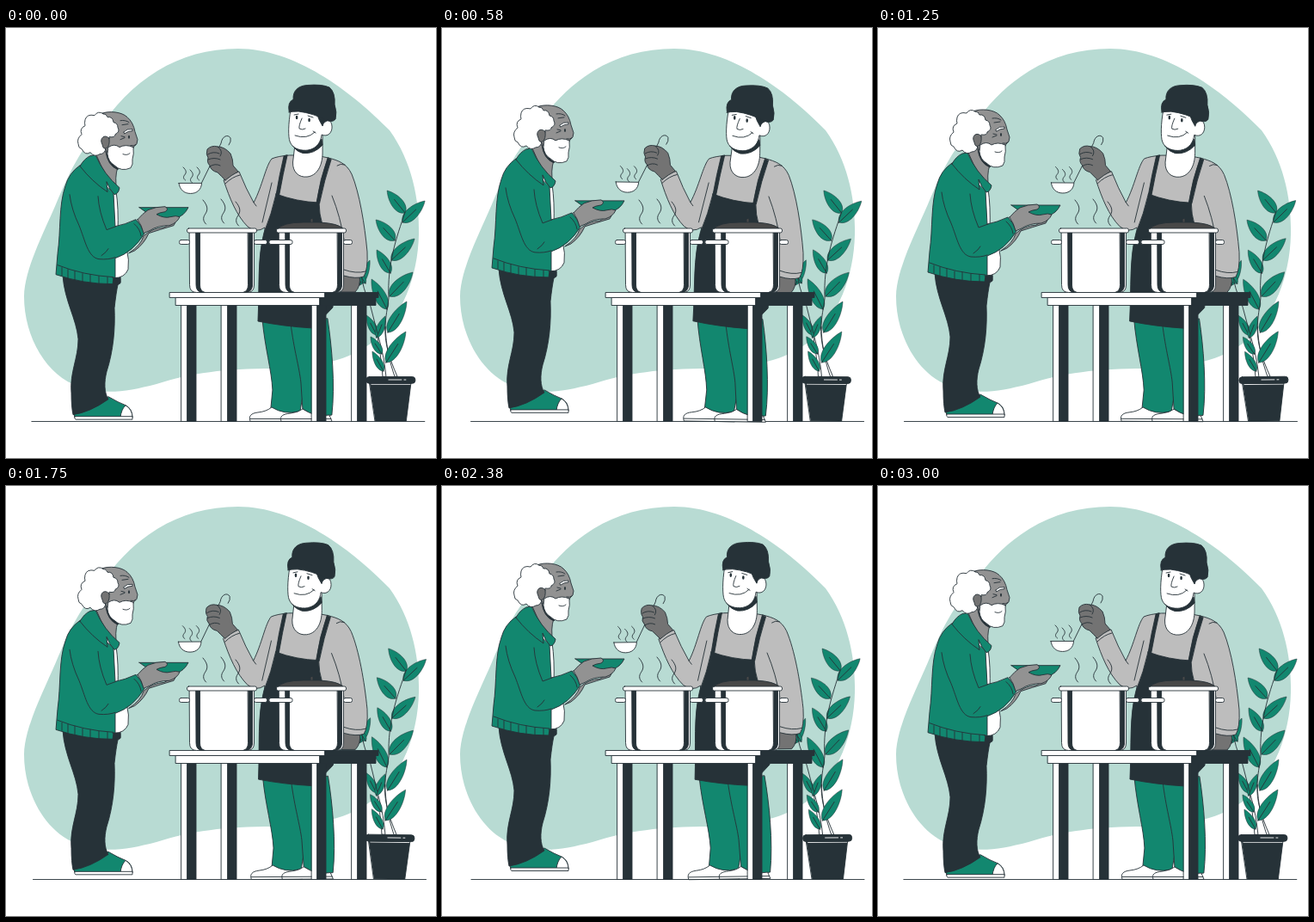
These frames come from a looping animation (500x500 px, 3040 ms). An HTML page:

```html
<!DOCTYPE html>
<html lang="en">
<head>
<meta charset="utf-8">
<title>Soup kitchen</title>
<style>
html, body { margin: 0; width: 100%; height: 100%; overflow: hidden; background: #fff; }
svg { display: block; width: 100vw; height: 100vh; }
path, rect, ellipse { stroke: #263238; stroke-width: .9; stroke-linecap: round; stroke-linejoin: round; }
.w { fill: #fff; }
.d { fill: #263238; }
.g { fill: #12876f; }
.l { fill: none; }
.skin { fill: #929292; }
.glove { fill: #737373; }
.wool { fill: #bdbdbd; }
.lid { fill: #484848; }
.x { stroke: none; }
.leaf { fill: #12876f; stroke-width: .5; }
.shine { fill: none; stroke: #fff; }
</style>
</head>
<body>
<svg viewBox="0 0 500 500">
  <path class="x" fill="#b8dbd3" d="M270 24C335 24 400 72 446 119C472 155 481 200 480 240C479 290 460 335 430 362C400 388 360 394 310 396C255 396 215 401 175 414C140 423 115 427 85 417C48 405 21 360 21 312C22 280 42 242 58 205C75 165 85 145 105 122C145 60 200 24 270 24Z"/>
  <path id="floor" class="l" d="M30 457.5H487"/>

  <g id="plant">
    <g id="leaves"></g>
    <path class="d" d="M423 413H471L465.500 457H429.500Z"/>
    <path class="shine" d="M425 414.300H470"/>
    <rect class="d" x="419" y="405.500" width="57" height="7.800" rx="3.500"/>
    <path class="shine" d="M445 409H460M463 409H465"/>
  </g>

  <g id="chef">
    <!-- legs and shoes -->
    <path class="g" d="M298 338C301 372 309 398 310 421L308 442Q325 452 342 446L350 400L344 343Z"/>
    <path class="g" d="M331 343C335 375 341 394 343 412L345 443Q360 454 379 450C383 415 379 370 374 338Z"/>
    <path class="w" d="M284 457C282 451 285 448 293 447Q303 446 309 441Q324 450 340 446L343 457Z"/>
    <path class="w" d="M320 457C318 451 322 449 331 448Q340 447 345 443Q360 453 376 450L379 457Z"/>
    <path class="l" d="M284 454.500H320M320 454.500H378"/>
    <!-- right hand and sweater -->
    <path class="glove" d="M393 283L411 288Q413 300 406 307H390Z"/>
    <path class="wool" d="M329 148Q316 149 309 152C302 160 298 184 288 203Q279 187 271 167Q260 170 253 177C260 198 268 218 281 231Q291 239 301 232L298 300H380L393 288Q407 292 416 289Q421 281 420 260C417 228 411 192 402 170C396 157 386 154 375 151L360 148Z"/>
    <path class="l" d="M393 281Q407 286 418 283M288 203L291 207M309 180Q303 205 298 226M385 160Q389 157 394 159M379 195Q389 220 393 246M255 181Q263 173 272 171"/>
    <!-- apron -->
    <path class="d" d="M314 193Q338 202 364 203Q364 216 368 229L386 250L380 325L357 349Q323 347 293 341C295 300 292 268 300 238Q309 216 314 193Z"/>
    <path class="d" d="M323 149Q318 170 314 194L317.500 195Q322 170 327 148ZM374 151Q365 176 361 203L364.500 204Q370 177 378 153Z"/>
    <!-- head -->
    <path class="w" d="M336 135L333.500 156C333 168 341 174 350 173C361 172 368 161 368 145V122Z"/>
    <path class="d" d="M333 137Q349 146 367 129L368 136Q358 147 345 145.500Q338 144 333 137Z"/>
    <path class="w" d="M331 95C328 111 328 127 330 132C333 141 344 143 351 142C362 140 366 132 367 124C374 127 379 122 379 115Q379 108 373 106L362 98Z"/>
    <path class="d" d="M361 99L377 107Q369 108 368 114Q364 108 361 99Z"/>
    <path class="d" d="M329 97Q327 86 334 83C333 73 340 67 350 66.500Q367 65 376 69Q383 75 382 89Q385 98 383 106Q380 110 373 107.500Q357 99 340 97Q332 97 329 98Z"/>
    <path class="l" d="M344 105Q340 114 341 117Q344 119 348 117M336 125Q350 130 359 121M357 120L360 122M335 101L340 100M351 102L357 104"/>
    <ellipse class="d x" cx="338" cy="104" rx="1.300" ry="2.300"/>
    <ellipse class="d x" cx="352.500" cy="107" rx="1.300" ry="2.300"/>
    <!-- ladle -->
    <path class="l" d="M227 181L250 134C251 126 258 123 261 128Q262 132 259 136"/>
    <path class="w" d="M201 180.500H227.500C227 188 222 192.500 214.500 192.500C207 192.500 202 188 201 180.500Z"/>
    <path class="glove" d="M255 177Q250 172 246 168Q238 166 237 160Q233 156 235 151Q232 147 234 141Q239 136 246 138Q254 138 261 146Q264 153 264 160L270 167Q262 171 255 177Z"/>
    <path class="l" d="M234.500 147Q241 143 248 146M235 153Q242 150 249 153M237 161Q243 157 249 160M246 138Q253 143 249 149"/>
    <g id="wisps"></g>
  </g>

  <g id="table"></g>
  <g id="pots"></g>

  <g id="man">
    <!-- trousers and shoes -->
    <path class="g" d="M80 453L78 446L119 429Q131 436 139 439Q147 443 147 453Z"/>
    <path class="w" d="M133 453Q134 444 139 439Q147 444 147 453Z"/>
    <path class="w" d="M80 452H147V455.500H81Q79 455 80 452Z"/>
    <path class="d" d="M66 288C68 318 82 338 84 362C84 385 74 400 76 425Q76 441 78 450Q98 447 119 432C114 424 114 412 117 400C125 375 127 350 126 326Q128 308 130 299L133 297V286Z"/>
    <!-- shirt, neck and far arm -->
    <path class="w" d="M116 180L128 190Q131 210 130 237Q145 258 142 281Q138 291 126 291Z"/>
    <path class="skin" d="M143 262Q157 253 160 242Q170 233 184 232Q197 225 201 219L195 230Q178 235 166 239Q161 251 150 259Z"/>
    <path class="skin" d="M105 148L119 139L130 162Q126 174 129 190Q118 179 105 148Z"/>
    <!-- jacket -->
    <path class="g" d="M86 160Q73 169 69 184C61 207 64 235 60 263Q59 275 58 287Q90 298 124 298L125 291H127L127 268Q148 261 161 239Q157 229 151 223Q138 229 127 231L125 192Z"/>
    <path class="g" d="M86 161Q91 152 98 149L104 148Q114 171 132 186Q131 193 126 194Q120 188 117 179L118 191Q100 179 86 161Z"/>
    <path class="l" d="M74 194Q76 211 85 230C92 247 95 267 108 269Q119 270 127 267M107 196Q108 214 117 235L128 231M60 276Q90 288 125 290M65 279V288M72 281V291M80 283V293M89 286V295M98 287V296M108 289V297M118 290V298M124 291H133V296M149 228Q156 234 157 242M111 265Q117 261 119 257"/>
    <!-- bowl and near hand -->
    <path class="g" d="M155 209H212Q207 219 198 221H174Q164 216 155 209Z"/>
    <path class="skin" d="M153 223Q159 216 165 212Q174 208 185 208Q190 211 185 214Q178 215 175 217Q184 222 191 220Q198 218 202 220Q199 227 190 230Q176 230 167 236L160 239Q158 230 153 223Z"/>
    <!-- head -->
    <path class="skin" d="M110 100C120 96 135 98 141 104Q148 110 150 121L153 130Q153 136 149 138L145 146L118 145L106 123Z"/>
    <path class="d" d="M116 144Q120 159 132 162L130 165Q118 160 116 144Z"/>
    <path class="w" d="M119 139Q126 134 132 139Q139 135 148 139Q149 147 147 153Q148 159 145 163Q134 168 126 160Q119 156 118 147Z"/>
    <path class="w" d="M113 100Q107 96 103 102Q94 100 92 107Q91 111 92 114Q85 117 88 124Q82 129 84 135Q84 140 88 141Q92 149 98 145Q103 151 109 147Q115 147 116 140L120 127Q127 128 127 124Q133 121 130 116Q130 111 125 110Q124 103 118 104Q117 100 113 100Z"/>
    <path class="glove" d="M120 129Q117 125 113 127Q109 130 112 136Q113 142 117 140Q121 137 120 129Z"/>
    <path class="l" d="M133 108Q139 107 143 110M135 113L142 112M134 126L138 127M133 130L138 128M145 137Q149 138 151 136M136 147Q141 149 144 146"/>
    <path class="w" d="M137 121Q141 117 147 118L147 120Q142 120 138 123Z"/>
    <ellipse class="d x" cx="143" cy="127" rx="1" ry="2"/>
  </g>
</svg>
<script>
const $ = id => document.getElementById(id);
const path = (cls, d) => `<path class="${cls}" d="${d}"/>`;
const box = (cls, x1, y1, x2, y2, r = 0) =>
  `<rect class="${cls}" x="${x1}" y="${y1}" width="${x2 - x1}" height="${y2 - y1}" rx="${r}"/>`;

// A leaf from base (x, y) to tip (u, v), w wide on each side
function leaf([x, y, u, v, w]) {
  const dx = u - x, dy = v - y, len = Math.hypot(dx, dy);
  const at = (k, side) => `${x + dx * k - dy / len * side} ${y + dy * k + dx / len * side}`;
  return path('leaf', `M${x} ${y}C${at(.15, w * 1.2)} ${at(.7, w * .8)} ${u} ${v}C${at(.7, -w * .8)} ${at(.15, -w * 1.2)} ${x} ${y}Z`) +
    path('l', `M${x} ${y}L${at(.6, 0)}`);
}

const leaves = [
  [464, 215, 443, 189, 9], [461, 226, 487, 201, 9],
  [452, 247, 430, 223, 9], [448, 270, 475, 245, 9],
  [447, 285, 431, 258, 8], [446, 312, 473, 284, 10],
  [443, 327, 425, 292, 9], [444, 354, 466, 318, 9],
  [442, 389, 465, 353, 9], [411, 299, 423, 270, 6],
  [418, 297, 407, 281, 5], [431, 357, 419, 334, 6],
  [431, 360, 441, 335, 6], [437, 379, 424, 359, 6],
  [439, 399, 426, 376, 6]
];
$('leaves').innerHTML =
  path('w', 'M455 405C445 382 440 365 441 347C442 370 446 388 452 405Z') +
  path('w', 'M442 405C440 385 436 368 431 352C434 372 437 388 438 405Z') +
  leaves.map(leaf).join('') +
  path('l', 'M441 350C441 335 444 325 445 314C443 275 454 243 464 214') +
  path('l', 'M432 355L424 324Q414 300 413 286');

// Wavy line of steam, h tall
const steam = (x, y, h, w) =>
  path('l', `M${x} ${y}c${w} ${h * .25} ${w} ${h * .42} ${w * .4} ${h * .6}c${-w * .5} ${h * .16} ${-w * .3} ${h * .3} ${w * .2} ${h * .4}`);
$('wisps').innerHTML = [[206, 162], [214, 165], [222, 162]].map(([x, y]) => steam(x, y, 15, 4)).join('');

const leg = (x, mid, end) => box('w', x, 322, mid, 457.500) + box('d', mid, 322, end, 457.500);
$('table').innerHTML =
  leg(204, 211, 221) + leg(250.500, 258, 268) + leg(402, 409, 419) + leg(355.500, 362, 372) +
  box('w', 197.500, 313.500, 365, 322.500) + box('d', 365, 313.500, 430, 322.500) +
  box('w', 190.500, 307.500, 371, 313.500) + box('d', 371, 307.500, 433, 313.500);

function pot(x, handle) {
  const r = x + 75;
  return path('w', `M${x} 237H${r}V299Q${r} 307.500 ${r - 8} 307.500H${x + 8}Q${x} 307.500 ${x} 299Z`) +
    path('d', `M${x + 7.5} 238h4.500V299q0 7 6 8.500h-4q-6.500 -1 -6.500 -8.500Z`) +
    path('d', `M${r - 7} 238h5V300q-1 7 -7 7.500h-4q6 -1.500 6 -8.500Z`) +
    box('w', x - 3, 233, r + 3, 238, 2) +
    box('w', x - 12, 246.500, x, 251.500, 2) + box('w', r, 246.500, r + handle, 251.500, 2);
}
$('pots').innerHTML =
  [[229, 200], [250, 199], [267, 202]].map(([x, y]) => steam(x, y, 28, 6)).join('') +
  pot(213.500, 15) +
  box('lid', 354, 221.500, 357, 228, 1) +
  path('lid', 'M316 234Q321 226 346 226H364Q387 227 393 234Z') +
  pot(317.500, 10) +
  box('w', 306, 246.500, 333, 251.500, 2);

// Value at phase p of a linear track of [phase, value] steps
function track(steps, p) {
  const i = steps.findIndex(s => s[0] >= p) || 1;
  const [a, u] = steps[i - 1], [b, v] = steps[i];
  return u + (v - u) * (p - a) / (b - a);
}
const sway = [[0, 0], [.25, 1], [.75, -1], [1, 0]];
const float = [[0, 0], [.5, -10], [1, 0]];
const shake = [0, -1, 2, -4, 4, -4, 4, -4, 2, -1, 0].map((v, i) => [i / 10, v]);

const LOOP = 3040, STEP = 1000 / 24, LEAD = 25;
function draw(now) {
  const k = Math.min(72, Math.floor((now % LOOP + 9) / STEP));
  const t = k * STEP + LEAD;
  const slow = t % 3000 / 3000, fast = t % 1500 / 1500;
  const set = (id, v) => $(id).setAttribute('transform', v);
  set('man', `translate(0 ${track(float, fast)})`);
  set('chef', `rotate(${track(sway, slow)} 311 262)`);
  set('plant', `rotate(${track(sway, fast)} 449 322)`);
  set('floor', `translate(${track(shake, fast)} 0)`);
}
const start = performance.now();
function tick() {
  draw(performance.now() - start);
  requestAnimationFrame(tick);
}
tick();
</script>
</body>
</html>
```
